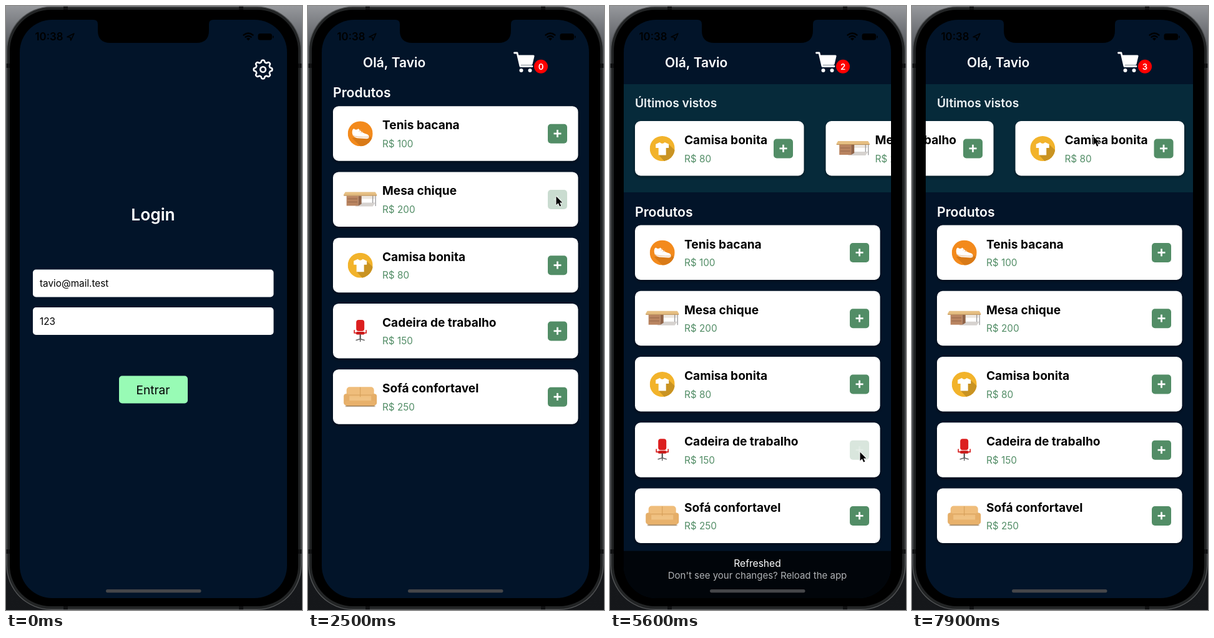
An HTML page with a canvas that plays this animation: 474 by 966 pixels, repeating every 8 s.

```html
<!DOCTYPE html>
<html lang="pt">
<head>
<meta charset="utf-8">
<title>Loja</title>
<style>
  html, body { margin: 0; width: 100%; height: 100%; overflow: hidden; background: #000; }
  canvas { display: block; width: 474px; height: 966px; }
</style>
</head>
<body>
<canvas></canvas>
<script>
const W = 474, H = 966, LOOP = 8000;
const SCREEN = { x: 22, y: 22, w: 428, h: 925, r: 52 };
const NAVY = '#021429', GREEN = '#528d66';
const canvas = document.querySelector('canvas');
const ctx = canvas.getContext('2d');
const ratio = window.devicePixelRatio || 1;
canvas.width = W * ratio;
canvas.height = H * ratio;

const clamp = v => Math.min(1, Math.max(0, v));
const ease = (t, start, duration) => {
  const u = clamp((t - start) / duration);
  return u * u * (3 - 2 * u);
};

// ---- drawing helpers ----
function at(x, y, draw) {
  ctx.save();
  ctx.translate(x, y);
  draw();
  ctx.restore();
}
function box(x, y, w, h, r, color) {
  ctx.beginPath();
  ctx.roundRect(x, y, w, h, r);
  ctx.fillStyle = color;
  ctx.fill();
}
function disc(x, y, r, color) {
  ctx.beginPath();
  ctx.arc(x, y, r, 0, 2 * Math.PI);
  ctx.fillStyle = color;
  ctx.fill();
}
function fill(d, color) {
  ctx.fillStyle = color;
  ctx.fill(new Path2D(d));
}
function stroke(d, color, width) {
  ctx.strokeStyle = color;
  ctx.lineWidth = width;
  ctx.lineCap = ctx.lineJoin = 'round';
  ctx.stroke(new Path2D(d));
}
function text(str, x, y, size, weight, color, align = 'left') {
  ctx.font = `${weight} ${size}px Inter, Roboto, sans-serif`;
  ctx.textAlign = align;
  ctx.fillStyle = color;
  ctx.fillText(str, x, y);
}

// ---- product icons, centred on 0,0 ----
function badgeIcon(color, shade, shadow, drawShape) {
  ctx.save();
  ctx.beginPath();
  ctx.arc(0, 0, 20, 0, 2 * Math.PI);
  ctx.clip();
  ctx.fillStyle = color;
  ctx.fillRect(-20, -20, 40, 40);
  fill(shadow, shade);
  drawShape();
  ctx.restore();
}
function shoe() {
  badgeIcon('#f38a1c', '#d97a17', 'M13 2L32 20L12 32L-13 7Z', () => {
    fill('M-13 -2Q-13 -8 -10 -8Q-7 -5 -3 -8Q2 -2 8 0Q14 1 14 5Q14 8 10 8L-5 7Q-13 5 -13 -2Z', '#fff');
    stroke('M-12 3Q-6 6 13 5.5M-2 -4L1 -6M1 -1.5L4 -3.5', '#e9b98a', 1);
  });
}
function shirt() {
  badgeIcon('#f2b32b', '#c99322', 'M10 -7L32 14L14 32L-6 10Z', () =>
    fill('M-10.5 -7L-4 -10Q0 -6 4 -10L10.5 -7V-1H6V10.5H-6V-1H-10.5Z', '#fff'));
}
function desk() {
  fill('M-4 5H24L20 11H-8Z', '#d6d2cf');
  fill('M-3 -6H23V-1H-3Z', '#ece6df');
  box(-22, -6, 19, 16, 0, '#b98460');
  fill('M-3 -6L2 -6V7L-3 10Z', '#8f6348');
  stroke('M-20 -1H-5M-20 4H-5', '#94664a', 1);
  stroke('M24.5 -6V10M20 -6V5', '#8f8f92', 1.2);
  fill('M-24 -12H24L26.5 -8V-6H-26.5V-8Z', '#e6bf83');
  stroke('M-26 -6.5H26', '#b88c55', 1);
}
function chair() {
  box(-6.5, -18, 13, 18, 4, '#dc1f1f');
  box(-7, 1, 14, 4.5, 2, '#c91717');
  stroke('M-9.5 -1V3H-6M9.5 -1V3H6', '#d82a2a', 1.8);
  stroke('M0 6V13', '#444', 2);
  stroke('M-6.5 14.5L0 12.5L6.5 14.5M0 13V16.5', '#666', 1.5);
}
function sofa() {
  fill('M-24 13H24V16H-24Z', '#c9c1b6');
  box(-22, -16, 44, 20, 5, '#efbd7b');
  stroke('M0 -15V2M-20 -3H20', '#d49d58', 1);
  box(-20, 0, 40, 9, 2, '#f0c283');
  box(-26.5, -5, 9, 18, 4, '#e5ae68');
  box(17.5, -5, 9, 18, 4, '#e5ae68');
  box(-24, 6, 48, 8, 2, '#e8b16b');
  stroke('M-22 14.5H22', '#99703f', 1);
}

const products = [
  { name: 'Tenis bacana', price: 100, icon: shoe },
  { name: 'Mesa chique', price: 200, icon: desk, slideWidth: 255 },
  { name: 'Camisa bonita', price: 80, icon: shirt, slideWidth: 270.5 },
  { name: 'Cadeira de trabalho', price: 150, icon: chair, slideWidth: 321 },
  { name: 'Sofá confortavel', price: 250, icon: sofa },
];

// ---- timeline ----
const presses = {
  enter: [930, 1080], desk: [2330, 2450], shirt: [3460, 3590],
  chair: [5420, 5620], slide: [6670, 6920],
};
const pressAlpha = (t, [down, up]) =>
  1 - 0.78 * ease(t, down, 150) * (1 - ease(t, up, 250));
const rowPress = [null, presses.desk, presses.shirt, presses.chair, null];

// Each entry: product index and when it enters the cart
const additions = [[1, 2550], [2, 3750], [3, 5800]];
const banners = [[3850, 5520], [5950, 7450]];
const cursorPath = [
  [500, 104, 717], [880, 216, 626], [1700, 216, 626], [2250, 397, 304],
  [2800, 397, 304], [3400, 394, 595], [3800, 394, 595], [4400, 361, 557],
  [4700, 361, 557], [5300, 400, 713], [5850, 400, 713], [6500, 302, 222],
  [6700, 302, 222], [7300, 110, 196], [7900, 290, 208],
];
function cursorAt(t) {
  let [, x, y] = cursorPath[0];
  for (let i = 1; i < cursorPath.length; i++) {
    const [t0, x0, y0] = cursorPath[i - 1], [t1, x1, y1] = cursorPath[i];
    const u = ease(t, t0, t1 - t0);
    x += (x1 - x0) * u;
    y += (y1 - y0) * u;
  }
  return [x, y];
}
function pushProgress(t) {
  const s = Math.max(0, t - 1050) * 0.0123;
  return t > 2000 ? 1 : 1 - (1 + s) * Math.exp(-s);
}

// ---- screens ----
function gear(cx, cy) {
  let d = '';
  for (let i = 0; i < 96; i++) {
    const a = i / 96 * 2 * Math.PI;
    const r = 13.2 + 1.7 * Math.tanh(2 * Math.cos(8 * a));
    d += `${i ? 'L' : 'M'}${cx + r * Math.cos(a)} ${cy + r * Math.sin(a)}`;
  }
  stroke(d + 'Z', '#fff', 2.6);
  stroke(`M${cx - 4.3} ${cy}a4.3 4.3 0 1 0 8.6 0a4.3 4.3 0 1 0 -8.6 0`, '#fff', 2.6);
}

function drawLogin(t) {
  ctx.fillStyle = NAVY;
  ctx.fillRect(22, 22, 428, 925);
  gear(411.5, 101.5);
  text('Login', 235.5, 343, 26.3, 600, '#fff', 'center');
  box(43, 421.5, 385.5, 44, 5, '#fff');
  text('tavio@mail.test', 54, 449, 15.3, 400, '#000');
  box(43, 482, 385.5, 44, 5, '#fff');
  text('123', 54, 509.5, 15.3, 400, '#000');
  ctx.globalAlpha = pressAlpha(t, presses.enter);
  box(181, 591.5, 110, 44, 5, '#98fbb5');
  text('Entrar', 235.5, 620.5, 19, 400, '#000', 'center');
  ctx.globalAlpha = 1;
}

function drawCard(product, x, y, width, press, t) {
  at(x, y, () => {
    ctx.save();
    ctx.shadowColor = 'rgba(0,0,0,.4)';
    ctx.shadowBlur = 5 * ratio;
    ctx.shadowOffsetY = 2 * ratio;
    box(0, 0, width, 87.5, 9, '#fff');
    ctx.restore();
    at(43.7, 44, product.icon);
    text(product.name, 79, 37, 19.1, 700, '#000');
    text('R$ ' + product.price, 79, 65.5, 15.3, 400, GREEN);
    ctx.globalAlpha = press ? pressAlpha(t, press) : 1;
    at(width - 48.5, 28.5, () => {
      box(0, 0, 31, 31, 5, GREEN);
      ctx.fillStyle = '#fff';
      ctx.fillRect(9.5, 14, 12, 2.7);
      ctx.fillRect(14.15, 9.3, 2.7, 12);
    });
    ctx.globalAlpha = 1;
  });
}

function drawHeader(count) {
  text('Olá, Tavio', 88, 98, 21, 600, '#fff');
  stroke('M330.5 75H335L340 96.5H359', '#fff', 2.8);
  fill('M335 78.5H361Q363 78.5 362.5 80.5L359.5 93Q359 94.5 357.5 94.5H339Z', '#fff');
  disc(341.5, 103, 3, '#fff');
  disc(355.5, 103, 3, '#fff');
  disc(373, 96.8, 11, '#fe0000');
  text(count, 373, 101.5, 13.2, 600, '#fff', 'center');
}

function drawHome(t) {
  const seen = additions.filter(([, time]) => t >= time).map(([index]) => products[index]).reverse();
  ctx.fillStyle = NAVY;
  ctx.fillRect(22, 22, 428, 925);
  drawHeader(seen.length);
  if (seen.length) {
    ctx.fillStyle = '#062a3a';
    ctx.fillRect(22, 125, 428, 173);
    text('Últimos vistos', 40, 161.5, 19.2, 600, '#eef3f5');
    let x = 40 - 230.5 * ease(t, 6730, 700);
    seen.forEach((product, i) => {
      drawCard(product, x, 184, product.slideWidth, i ? null : presses.slide, t);
      x += product.slideWidth + 35;
    });
  }
  const top = seen.length ? 350.5 : 160.2;
  text('Produtos', 40, top - 14, 21.2, 600, '#fff');
  products.forEach((product, i) =>
    drawCard(product, 40, top + i * 105.25, 392.5, rowPress[i], t));
}

function drawBanner(t) {
  for (const [show, hide] of banners) {
    const shown = ease(t, show, 250) - ease(t, hide, 300);
    if (shown <= 0) continue;
    at(0, 855 + 92 * (1 - shown), () => {
      ctx.fillStyle = 'rgba(0,0,0,.75)';
      ctx.fillRect(22, 0, 428, 92);
      text('Refreshed', 236, 26, 15.6, 400, '#fff', 'center');
      text("Don't see your changes? Reload the app", 236, 45, 15, 400, '#b0b2b5', 'center');
    });
  }
}

function drawStatusBar() {
  text('10:38', 46.5, 55.3, 16.8, 600, '#000');
  stroke('M98 49.5L109 44L103.8 55L103 50.2Z', '#000', 1.6);
  stroke('M380.5 46.5Q388 40.5 395.5 46.5M383.5 49.7Q388 46.3 392.5 49.7', '#000', 2.3);
  fill('M385 52.2Q388 50 391 52.2L388 55.2Z', '#000');
  box(403.5, 44, 22.5, 10.5, 3.5, '#000');
  box(427, 47.5, 1.5, 4, 1, '#000');
  box(160, 933, 152.5, 5.2, 2.6, '#454649');
}

function drawDevice() {
  const backdrop = ctx.createLinearGradient(0, 0, 0, H);
  [[0, '#96989c'], [0.07, '#55585d'], [0.2, '#25272a'], [1, '#15171a']]
    .forEach(([stop, color]) => backdrop.addColorStop(stop, color));
  ctx.fillStyle = backdrop;
  ctx.fillRect(0, 0, W, H);
  box(0.5, 0.5, 473, 965.5, 72, '#56585a');
  box(2, 2, 470, 962.5, 70, '#222425');
  ctx.fillStyle = '#101112';
  for (const y of [92, 869]) ctx.fillRect(1, y, 472, 7);
  for (const x of [92, 373]) ctx.fillRect(x, 1, 7, 964);
  box(6, 6, 462, 954, 66, '#000');
}

function drawNotch() {
  fill('M140 21V22Q147 22 147 29V39Q147 59 167 59H305Q325 59 325 39V29Q325 22 332 22V21Z', '#000');
}

function drawCursor(t) {
  if (t < 100) return;
  at(...cursorAt(t), () => {
    const arrow = 'M.5 .5V14.2L3.7 11.3L6.1 16.6L8.3 15.6L6 10.5H10.4Z';
    stroke(arrow, '#fff', 1.6);
    fill(arrow, '#000');
  });
}

function render(t) {
  ctx.setTransform(ratio, 0, 0, ratio, 0, 0);
  drawDevice();
  ctx.save();
  ctx.beginPath();
  ctx.roundRect(SCREEN.x, SCREEN.y, SCREEN.w, SCREEN.h, SCREEN.r);
  ctx.clip();
  const push = pushProgress(t);
  if (push < 1) {
    at(-0.3 * SCREEN.w * push, 0, () => drawLogin(t));
    ctx.fillStyle = `rgba(0,0,0,${0.1 * push})`;
    ctx.fillRect(22, 22, 428, 925);
  }
  if (push > 0) at(SCREEN.w * (1 - push), 0, () => drawHome(t));
  drawBanner(t);
  drawStatusBar();
  ctx.restore();
  drawNotch();
  drawCursor(t);
}

const started = performance.now();
function tick() {
  render((performance.now() - started) % LOOP);
  requestAnimationFrame(tick);
}
tick();
</script>
</body>
</html>
```
